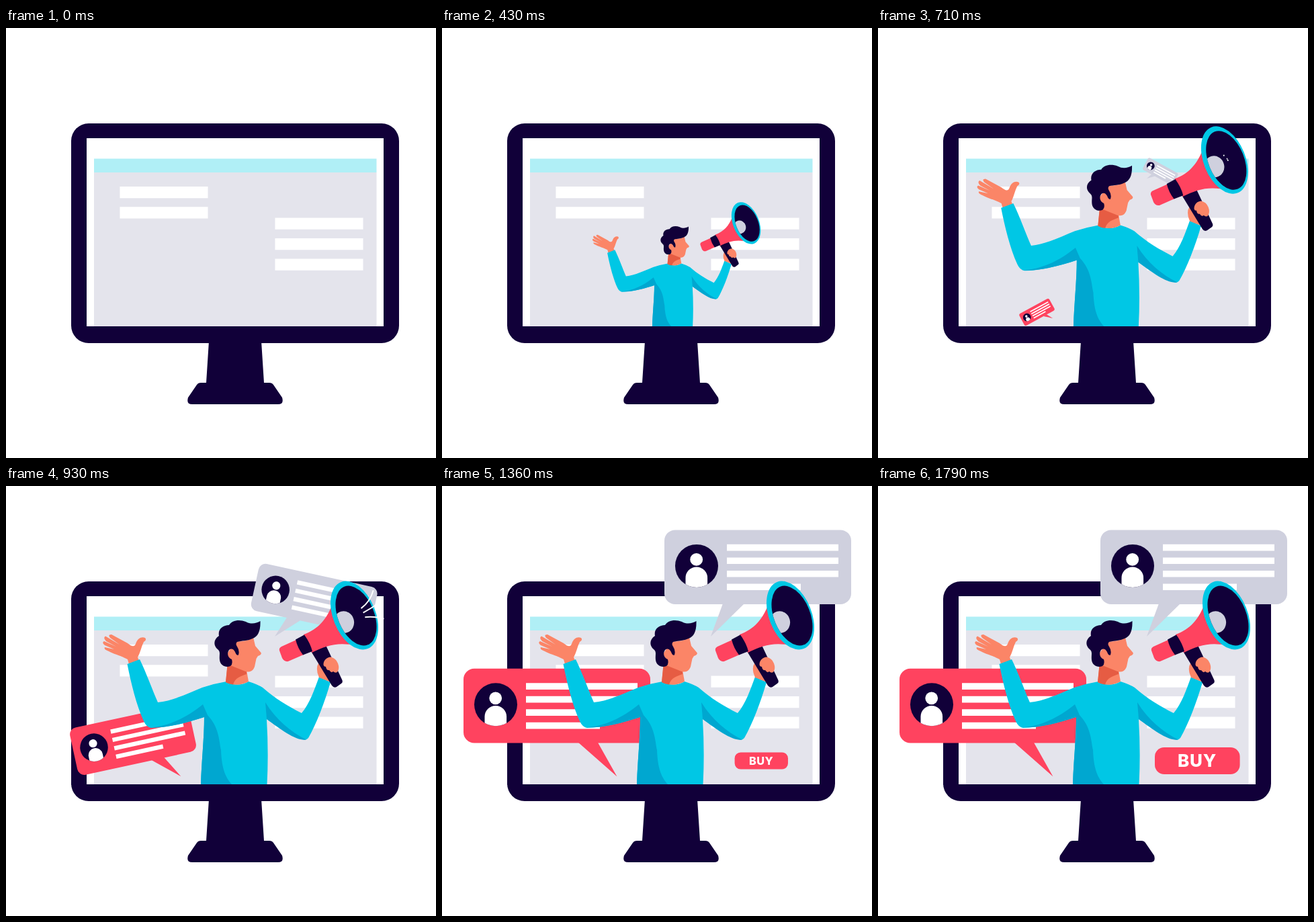
Write an HTML page that moves like this. It is 640 by 640 pixels and loops after 3.64 s.

```html
<!DOCTYPE html>
<html lang="en">
<head>
<meta charset="utf-8">
<title>Online promotion</title>
<style>
html, body { margin: 0; width: 100%; height: 100%; overflow: hidden; background: #fff; }
svg { display: block; width: 100%; height: 100%; }
.navy { fill: #110039; }
.cyan { fill: #00c7e5; }
.shade { fill: #00a7d0; }
.pink { fill: #ff435f; }
.skin { fill: #fb8567; }
.grey { fill: #cfd0de; }
.white { fill: #fff; }
#rays path { fill: none; stroke: #fff; stroke-width: 2; }
#buy text { font: 800 26px Inter, "Open Sans", sans-serif; letter-spacing: .8px; text-anchor: middle; }
</style>
</head>
<body>
<svg viewBox="0 0 640 640">
  <defs>
    <clipPath id="face"><circle cx="48" cy="53.5" r="32"/></clipPath>
    <clipPath id="mouth"><ellipse cx="521" cy="193" rx="27" ry="46.7" transform="rotate(-22 521 193)"/></clipPath>
    <g id="card">
      <rect width="278" height="110.6" rx="16"/>
      <circle class="navy" cx="48" cy="53.5" r="32"/>
      <g class="white">
        <circle cx="47.7" cy="44" r="9.4"/>
        <path clip-path="url(#face)" d="M31.5 90V71.500a16.300 16.300 0 0 1 32.600 0V90Z"/>
        <path d="M93 21.400h166v9.700h-166zM93 41h166v9.700h-166zM93 60.500h166v9.700h-166zM93 80h110v9.700h-110z"/>
      </g>
    </g>
  </defs>

  <g id="monitor">
    <rect class="navy" x="97" y="142" width="488" height="327" rx="26"/>
    <path class="navy" d="M302 466H380L384 528H392Q396 528 398 531L411 550Q414 560 405 560H277Q268 560 271 550L284 531Q286 528 290 528H298Z"/>
    <rect class="white" x="120" y="164" width="442" height="280"/>
    <rect x="131" y="215" width="420.500" height="229" fill="#e4e4ec"/>
    <rect x="131" y="194.500" width="420.500" height="20.500" fill="#b0eff6"/>
    <path class="white" d="M169.500 236h131v17.300h-131zM169.500 266.200h131v17.300h-131zM400.500 282.500h131v17.300h-131zM400.500 313h131v17.300h-131zM400.500 343.500h131v17.300h-131z"/>
  </g>

  <g id="redBubble" class="pink">
    <path d="M202 381H231.500L260.500 432.500Z"/>
    <use href="#card" x="32" y="271.800"/>
  </g>
  <g id="greyBubble" class="grey">
    <path d="M418 175H450L400 224Z"/>
    <use href="#card" x="331" y="65.400"/>
  </g>

  <g id="man">
    <path class="skin" d="M183 265L181 258C172 253 160 250 153 246Q145 243 147 240L161 243L147 237Q142 233 146 231L164 239L149 231Q144 226 148 223.500L169 236L155 226Q151 221 157 221L181 234C187 239 191 240 193 235C196 226 202 224 207 226Q210 229 205 232C201 240 200 248 196 255L198 260Z"/>
    <path class="cyan" d="M180.500 265L199 258C208 276 218 304 226 322C248 320 272 308 292 300Q310 294 328 291Q345 300 361 291Q374 295 382 300C400 316 420 328 440 338C452 324 459 303 466 284L483 292C474 323 462 354 450 375Q447 379 441 377C423 372 405 359 388 347Q391 397 388.500 444H290C291 410 295 375 295 344C270 352 240 360 216 360Q209 359 205 350C194 326 186 293 180.500 265Z"/>
    <path class="shade" d="M212 359C240 359 270 344 293 325L300 341C317 359 317 378 320 393C321 423 328 435 336 444H290C291 410 295 375 295 344C270 352 240 361 212 359Z"/>
    <path class="shade" d="M386 322C402 348 424 366 447 377.500C432 380 410 363 388 347Z"/>
    <path class="skin" d="M330 262L327 292Q344 300 361 291L358 274Z"/>
    <path fill="#e65c43" d="M330 262L327 292Q332 295 338 295.500C341 285 350 283 358 280V274Z"/>
    <path class="skin" d="M341 232C354 231 363 230 368 225L371 238L379.500 248Q381 251 375 253L372.500 257L370 269C367 277 361 278 354 275L334 267L329 250Z"/>
    <path class="navy" d="M378.500 201C379 216 375 224 367 227C359 231 351 230 344 232Q341 235 344 239Q348 245 346 251.500Q343 253 341 247Q337 240 332 244C328 250 331 256 336 258Q338 265 334 268C327 271 319 267 318 259C317 251 320 247 315 243C308 237 309 228 317 223C315 213 323 207 332 207C336 200 347 198 357 202C364 206 372 205 378.500 201Z"/>
    <path class="skin" d="M466 285L463.500 278Q461 266 468 261Q474 262 470 270L482 285L481 291Z"/>
    <path class="navy" d="M454 246L476 237L500 288Q502 292 499 294L492 299Q488 301 485 297Z"/>
    <path class="skin" d="M473 262Q476 255 483 254.500Q491 256 494 264Q497 272 493 277Q490 279 487 276Q484 279 481 274Q477 275 476 269Q471 269 473 262Z"/>
    <path class="pink" d="M410 239L432 229L443 251L420 261Q414 262 411 256L407 245Q406 241 410 239Z"/>
    <path class="pink" d="M485 178C477 198 465 213 443 221L455 248C475 238 490 233 513 236Z"/>
    <path class="navy" d="M431 228.500L444 221.500Q453 234 456 246L442 251.500Q434 241 431 228.500Z"/>
    <ellipse class="cyan" cx="518.500" cy="192.500" rx="31.600" ry="53.500" transform="rotate(-22 518.500 192.500)"/>
    <ellipse class="navy" cx="521" cy="193" rx="27" ry="46.700" transform="rotate(-22 521 193)"/>
    <g clip-path="url(#mouth)"><ellipse class="grey" cx="503" cy="202.500" rx="15" ry="16.300" transform="rotate(-15 503 202.500)"/></g>
  </g>

  <g id="rays">
    <path pathLength="100" d="M514 190Q550 176 549 134"/>
    <path pathLength="100" d="M519 195Q546 182 571 162.500"/>
    <path pathLength="100" d="M520 197Q559 190 578.500 206"/>
  </g>

  <g id="buy">
    <rect class="pink" x="412" y="389" width="126.600" height="40" rx="14"/>
    <text class="white" x="475" y="418">BUY</text>
  </g>
</svg>
<script>
const LOOP = 3640, STEP = 1000 / 14, LAST = 25;
const el = id => document.getElementById(id);
const man = el('man'), red = el('redBubble'), grey = el('greyBubble'), buy = el('buy');
const rays = [...el('rays').children];

// eased progress from a to b
function ease(k, a, b) {
  const u = Math.min(1, Math.max(0, (k - a) / (b - a)));
  return u * u * (3 - 2 * u);
}

function pose(node, x, y, scale, turn = 0) {
  node.style.display = scale > .01 ? '' : 'none';
  node.setAttribute('transform',
    `translate(${x} ${y}) rotate(${turn}) scale(${scale}) translate(${-x} ${-y})`);
}

function draw(ms) {
  const k = Math.min(LAST, Math.floor((ms + 5) / STEP));

  pose(man, 349, 444, ease(k, -.55, 10.85));

  const pop = ease(k, 7.5, 16.65), turn = 35 * (1 - pop);
  pose(red, 260, 432, pop, -turn);
  pose(grey, 400, 224, pop, turn);

  const from = ease(k, 10.5, 18.5) * 100, to = ease(k, 9.5, 15) * 100;
  for (const ray of rays) {
    ray.style.display = to - from > 1 ? '' : 'none';
    ray.setAttribute('stroke-dasharray', `0 ${from} ${to - from} 200`);
  }

  pose(buy, 475.3, 409, 1.14 * ease(k, 15, 22.5) - .14 * ease(k, 23, 25));
}

let start;
function tick(now) {
  start ??= now;
  draw((now - start) % LOOP);
  requestAnimationFrame(tick);
}
draw(0);
requestAnimationFrame(tick);
</script>
</body>
</html>
```
